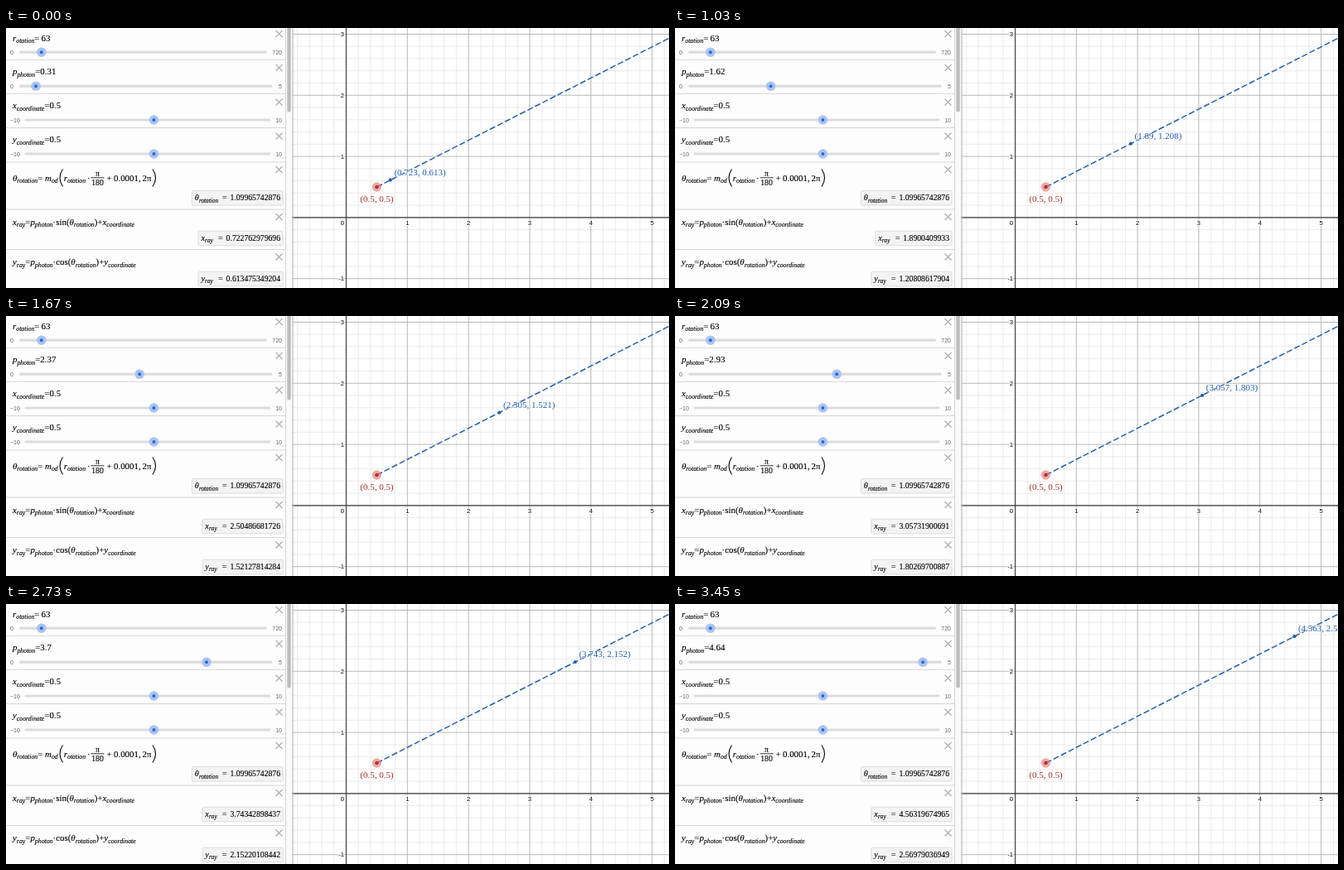
Animation, 800 px wide and 314 px high, one loop 3.48 s. Source, as an HTML page:

```html
<!DOCTYPE html>
<html lang="en">
<head>
<meta charset="utf-8">
<title>Photon ray</title>
<style>
html, body { margin: 0; width: 100%; height: 100%; overflow: hidden; background: #fff; }
svg { display: block; width: 800px; height: 314px; }
text { white-space: pre; }
.m { font-family: "Liberation Serif", "Times New Roman", serif; fill: #000; stroke: #000; stroke-width: .12px; }
.i { font-style: italic; }
.s { font: 7px "Liberation Sans", Arial, sans-serif; fill: #666; }
.a { font: 7.6px "Liberation Sans", Arial, sans-serif; fill: #000; stroke: #fff; stroke-width: 2px; paint-order: stroke; }
.l { font: 11px "Liberation Serif", "Times New Roman", serif; stroke: rgba(255,255,255,.7); stroke-width: 1.5px; paint-order: stroke; }
</style>
</head>
<body>
<svg id="stage" viewBox="0 0 800 314"></svg>
<script>
const BLUE = '#2460aa', RED = '#a83232';
const EM = 10.9, SUB = 7.8, OX = 410.5, OY = 228.9, UNIT = 73.82;
const THETA = 63 * Math.PI / 180 + 0.0001;
const px = x => OX + x * UNIT, py = y => OY - y * UNIT;

const line = (x1, y1, x2, y2, color, w = 1, extra = '') =>
  `<line x1="${x1}" y1="${y1}" x2="${x2}" y2="${y2}" stroke="${color}" stroke-width="${w}" ${extra}/>`;
const rect = (x, y, w, h, fill, extra = '') =>
  `<rect x="${x}" y="${y}" width="${w}" height="${h}" fill="${fill}" ${extra}/>`;
const text = (cls, x, y, str, extra = '') =>
  `<text class="${cls}" x="${x}" y="${y}" ${extra}>${str}</text>`;

// "x_ray=" style notation: subscripts after "_", variables in italics
function math(x, y, src, size = EM, tail = '') {
  let dy = 0;
  const runs = src.match(/_[a-z]+|sin|cos|[a-zθ]|[^_a-zθ]+/g).map(run => {
    const sub = run[0] === '_', shift = sub ? 2.6 : dy;
    dy = sub ? -2.6 : 0;
    const italic = sub || /^[a-zθ]$/.test(run);
    const fs = sub ? ` font-size="${size * SUB / EM}"` : '';
    return `<tspan dy="${shift}"${fs}${italic ? ' class="i"' : ''}>${sub ? run.slice(1) : run}</tspan>`;
  }).join('');
  return text('m', x, y, runs + tail, `font-size="${size}"`);
}

function slider(y, x1, x2, lo, hi, pos, id = '') {
  return rect(x1, y - 1.6, x2 - x1, 3.2, '#dcdcdc', 'rx="1.6"') +
    text('s', 5, y + 2.7, lo) + text('s', 333, y + 2.7, hi, 'text-anchor="end"') +
    `<g ${id && `id="${id}"`} transform="translate(${pos} ${y})">` +
    '<circle r="5.8" fill="#a9c4f0"/><circle r="2" fill="#2b6bd0"/></g>';
}

function chip(y, src, id, lead) {
  return `<g id="${id}" data-lead="${lead}">` +
    rect(0, y, 1, 17.6, '#f3f3f3', 'stroke="#dadada" stroke-width=".9" rx="1.5"') +
    `<g>${math(3.5, y + 11.6, src, 10.2)}${text('m', lead - 9.5, y + 11.6, '=', 'font-size="10"')}</g>` +
    text('m', 331, y + 11.6, '', 'font-size="9.7" text-anchor="end"') + '</g>';
}

function panel() {
  let s = rect(0, 0, 345, 314, '#fafafa') + rect(0, 0, 337.5, 314, '#fdfdfd');
  for (const y of [38.3, 79.3, 120.5, 162, 219, 267.5]) s += line(0, y, 337.5, y, '#d6d6d6');
  for (const y of [7, 48, 89.5, 130.5, 171, 228, 276.5])
    s += `<path d="M325.5 ${y - 4}l8 8m0-8l-8 8" stroke="#b4b4b4" stroke-width="1.5"/>`;
  s += line(337.5, 0, 337.5, 314, '#d4d4d4') + rect(339.3, -5, 4.4, 106.5, '#bcbcbc', 'rx="2.2"');

  s += math(8, 15.5, 'r_otation=', EM, '<tspan dx="2">63</tspan>') + slider(29.2, 16, 315, '0', '720', 42.8);
  s += math(8, 56, 'p_photon=', EM, '<tspan id="pval"></tspan>') + slider(70.2, 16, 321.5, '0', '5', 36, 'thumb');
  s += math(8, 97, 'x_coordinate=0.5') + slider(111, 22.5, 319.5, '−10', '10', 178.4);
  s += math(8, 138, 'y_coordinate=0.5') + slider(152, 22.5, 319.5, '−10', '10', 178.4);

  s += math(8, 184.5, 'θ_rotation=') + math(47, 184.5, 'm_od') + math(69.8, 184.5, 'r_otation') +
    text('m', 98, 184.5, '·', `font-size="${EM}"`) +
    text('m', 110.5, 178.8, 'π', 'font-size="10" text-anchor="middle"') +
    line(102.5, 180.8, 118.5, 180.8, '#000', .8) +
    text('m', 110.5, 189.8, '180', 'font-size="9.7" text-anchor="middle"') +
    math(121.5, 184.5, '+') + math(130, 184.5, '0.0001,') + math(164.5, 184.5, '2π') +
    '<path d="M68.5 170.5q-7 10.5 0 21M177 170.5q7 10.5 0 21" fill="none" stroke="#000" stroke-width="1.1"/>';
  s += math(8, 237.5, 'x_ray=p_photon·sin(θ_rotation)+x_coordinate');
  s += math(8, 286.3, 'y_ray=p_photon·cos(θ_rotation)+y_coordinate');
  return s + chip(196.4, 'θ_rotation', 'theta', 46) + chip(245.2, 'x_ray', 'xray', 33.5) + chip(294.2, 'y_ray', 'yray', 33.5);
}

function graph() {
  let s = rect(345, 0, 455, 314, '#fff');
  for (const minor of [true, false]) {
    const [color, w] = minor ? ['#e6e6e6', .8] : ['#b2b2b2', .9];
    for (let i = -5; i < 27; i++) {
      if ((i % 5 !== 0) !== minor) continue;
      const x = px(i / 5), y = py(i / 5);
      if (x > 345) s += line(x, 0, x, 314, color, w);
      if (y > 0 && y < 314) s += line(345, y, 800, y, color, w);
    }
  }
  s += line(OX, 0, OX, 314, '#444', 1.2) + line(345, OY, 800, OY, '#444', 1.2);
  s += text('a', 408, 238, '0', 'text-anchor="end"');
  for (let i = 1; i < 6; i++) s += text('a', px(i), 238, i, 'text-anchor="middle"');
  for (const i of [-1, 1, 2, 3]) s += text('a', 408, py(i) + 2.6, i, 'text-anchor="end"');

  s += line(px(.5), py(.5), px(.5 + 6 * Math.sin(THETA)), py(.5 + 6 * Math.cos(THETA)), BLUE, 1.5, 'stroke-dasharray="7.2 3"');
  s += `<circle cx="${px(.5)}" cy="${py(.5)}" r="5.7" fill="#e27c7c" fill-opacity=".65"/>` +
    `<circle cx="${px(.5)}" cy="${py(.5)}" r="2.3" fill="#b53434"/>`;
  s += text('l', 447.5, 209.8, '(0.5, 0.5)', `fill="${RED}" text-anchor="middle"`);
  s += `<g id="photon"><circle r="2.1" fill="${BLUE}"/>${text('l', 4.6, -6, '', `fill="${BLUE}"`)}</g>`;
  return s + '<defs><linearGradient id="shade"><stop stop-color="#bbb" stop-opacity=".8"/>' +
    '<stop offset="1" stop-color="#bbb" stop-opacity="0"/></linearGradient></defs>' + rect(345, 0, 3.5, 314, 'url(#shade)');
}

const $ = id => document.getElementById(id);
$('stage').innerHTML = graph() + panel();

function setChip(id, value) {
  const g = $(id), label = String(+value.toPrecision(12));
  const start = 331 - (label.length - 1) * 4.85 - 2.43, left = start - g.dataset.lead;
  g.children[0].setAttribute('x', left);
  g.children[0].setAttribute('width', 334 - left);
  g.children[1].setAttribute('transform', `translate(${left} 0)`);
  g.children[2].textContent = label;
}

// step, slider value, value the graph has caught up with
const KEYS = [[0, .31, .25], [18, .98, .92], [20, 1.1, 1.02], [34, 1.62, 1.56], [55, 2.37, 2.25],
  [69, 2.93, 2.87], [90, 3.7, 3.64], [114, 4.64, 4.56]];

function sample(n, col) {
  const k = Math.max(1, KEYS.findIndex(key => key[0] >= n));
  const a = KEYS[k - 1], b = KEYS[k];
  return +(a[col] + (b[col] - a[col]) * (n - a[0]) / (b[0] - a[0])).toFixed(2);
}

let last = -1;
function draw(now) {
  const t = now % 3480;
  const n = Math.min(114, Math.floor((Math.floor(t / 10) * 10 + 5) * .033)); // 33 steps a second
  if (n !== last) {
    last = n;
    const p = sample(n, 1), q = sample(n, 2);
    const x = q * Math.sin(THETA) + .5, y = q * Math.cos(THETA) + .5;
    $('pval').textContent = p;
    $('thumb').setAttribute('transform', `translate(${17.2 + 60.75 * p} 70.2)`);
    setChip('xray', x);
    setChip('yray', y);
    $('photon').setAttribute('transform', `translate(${px(x)} ${py(y)})`);
    $('photon').lastChild.textContent = `(${+x.toFixed(3)}, ${+y.toFixed(3)})`;
  }
}

setChip('theta', THETA);
const begin = performance.now();
function tick() {
  draw(performance.now() - begin);
  requestAnimationFrame(tick);
}
tick();
</script>
</body>
</html>
```
